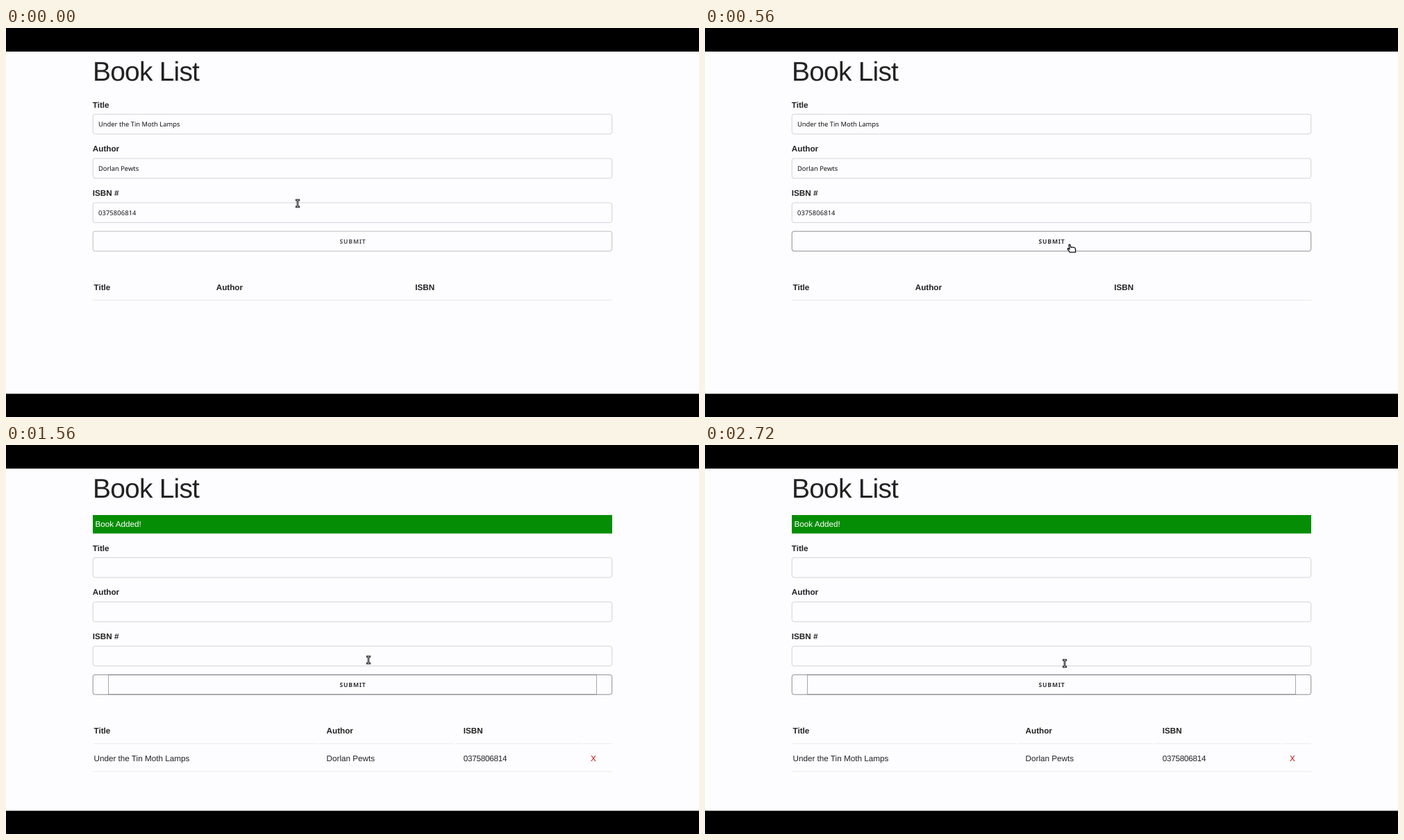
An HTML page for the animation above (2800 ms loop, 998 by 561 pixels).

```html
<!DOCTYPE html>
<html lang="en">
<head>
<meta charset="utf-8">
<title>Book List</title>
<style>
  html, body { margin: 0; width: 100%; height: 100%; overflow: hidden; background: #fdfcfe; }
  svg { display: block; width: 998px; height: 561px; }
  text { font: 11.69px "Liberation Sans", Arial, sans-serif; fill: #222; text-rendering: geometricPrecision; }
  .h1 { font-size: 38.95px; letter-spacing: -.78px; }
  .b { font-weight: 700; }
  .num { letter-spacing: -.26px; }
  .in { font: 9.35px "Noto Sans", sans-serif; fill: #111; }
  .in.num { letter-spacing: .11px; }
  .btn { font: 600 8.57px "Noto Sans", sans-serif; letter-spacing: .78px; }
  .box { fill: none; stroke: #d1d1d5; stroke-width: .95; }
  .rule { fill: none; stroke: #e8e8e8; stroke-width: .9; }
  .ring { fill: none; stroke: #555; stroke-width: 1; stroke-dasharray: 1 1; }
  .pen { stroke: #111; stroke-width: 1.3; stroke-linejoin: round; fill: #fff; }
</style>
</head>
<body>
<svg viewBox="0 0 998 561">
  <rect width="998" height="561" fill="#fdfcfe"/>
  <path d="M0 0H998V34H0ZM0 527.4H998V561H0Z"/>
  <text class="h1" x="125" y="75.6">Book List</text>

  <g id="form">
    <g id="fields"></g>
    <g id="values">
      <text class="in" x="133" y="142.4">Under the Tin Moth Lamps</text>
      <text class="in" x="133" y="206.3">Dorlan Pewts</text>
      <text class="in num" x="133" y="270.2">0375806814</text>
    </g>
    <rect id="button" class="box" x="125.2" y="293.2" width="747.5" height="28.6" rx="3"/>
    <rect id="ring" class="ring" x="147.5" y="293.5" width="703" height="28"/>
    <text id="caption" class="btn" x="480.6" y="311.2">SUBMIT</text>
  </g>

  <g id="empty">
    <text class="b" x="126.5" y="377.7">Title</text>
    <text class="b" x="302.7" y="377.7">Author</text>
    <text class="b" x="589.3" y="377.7">ISBN</text>
    <path class="rule" d="M125 392.5H873"/>
  </g>

  <g id="added">
    <rect x="125" y="101" width="748" height="26.6" fill="#058d05"/>
    <text x="128.5" y="118.3" style="fill:#fff">Book Added!</text>
    <text class="b" x="126.5" y="416">Title</text>
    <text class="b" x="461.6" y="416">Author</text>
    <text class="b" x="658.8" y="416">ISBN</text>
    <path class="rule" d="M126 430.8H448.5M450 430.8H645.5M647.5 430.8H829M830.5 430.8H873M125 470.8H873"/>
    <text x="126.5" y="455.7">Under the Tin Moth Lamps</text>
    <text x="461.6" y="455.7">Dorlan Pewts</text>
    <text class="num" x="658.8" y="455.7">0375806814</text>
    <text x="842" y="455.7" style="fill:#c80a0a">X</text>
  </g>

  <g id="cursor">
    <g id="beam" fill="none">
      <path d="M-3 -4.9H3M-3 4.9H3M0 -5V5" stroke="#111" stroke-width="2.6"/>
      <path d="M-2.1 -4.9H2.1M-2.1 4.9H2.1M0 -5V5" stroke="#ddd" stroke-width=".8"/>
    </g>
    <path id="hand" class="pen" transform="translate(2.8 5.7)"
      d="M-2.6 5.6L-5.4 1.4Q-6 -.4 -4.4 .2L-2.7 1.4L-3.8 -4.5Q-3.5 -6.2 -2 -5.2L-.9 -1.4Q2.6 -2.2 5.2 -.4Q6.2 1.2 5.6 5.6Z"/>
    <path id="arrow" class="pen" d="M0 0V12L2.8 9.6L4.6 13.4L6.6 12.4L4.9 8.8H8.6Z" style="fill:#111;stroke:#fff"/>
  </g>
</svg>
<script>
  const LOOP = 2800, STEP = 40, PRESS = 1440, ADDED = 1560, SHIFT = 38.1;
  const $ = id => document.getElementById(id);
  const show = (id, on) => $(id).style.display = on ? '' : 'none';

  $('fields').innerHTML = ['Title', 'Author', 'ISBN #'].map((label, i) => {
    const y = 63.85 * i;
    return `<text class="b" x="124.8" y="${114.5 + y}">${label}</text>
      <rect class="box" x="125.2" y="${124.3 + y}" width="747.5" height="28.6" rx="3"/>`;
  }).join('');

  // Pointer hotspot: time, x, y
  const path = [
    [0, 420, 253], [80, 442, 257], [160, 520, 273], [240, 608, 294], [320, 646, 304],
    [400, 615, 308], [480, 556, 311], [560, 525, 312], [600, 525, 312], [760, 522, 311],
    [1400, 522, 311], [1520, 521, 310], [1560, 522, 310], [1680, 523, 309],
    [1880, 523, 309], [2080, 523.5, 307.5], [2360, 523.5, 307.5], [2720, 518, 315], [2800, 518, 315]
  ];

  function pointAt(t) {
    const i = path.findIndex(p => p[0] > t);
    const [t0, x0, y0] = path[i - 1], [t1, x1, y1] = path[i];
    const k = (t - t0) / (t1 - t0);
    return [x0 + (x1 - x0) * k, y0 + (y1 - y0) * k];
  }

  function draw(time) {
    const t = Math.floor(time % LOOP / STEP) * STEP;
    const [x, y] = pointAt(t);
    const added = t >= ADDED, pressed = t >= PRESS;
    const over = !added && y >= 293;
    const gap = !added && y >= 281 && y < 293;
    const active = over || pressed;

    $('form').setAttribute('transform', `translate(0 ${added ? SHIFT : 0})`);
    $('button').style.stroke = active ? '#888890' : '#bbbbc2';
    $('caption').style.fill = active ? '#333' : '#555';
    show('values', !added);
    show('empty', !added);
    show('added', added);
    show('ring', pressed);

    $('cursor').setAttribute('transform', `translate(${x} ${y})`);
    show('hand', over);
    show('arrow', gap);
    show('beam', !over && !gap);
  }

  const start = performance.now();
  function tick() {
    draw(performance.now() - start);
    requestAnimationFrame(tick);
  }
  tick();
</script>
</body>
</html>
```
